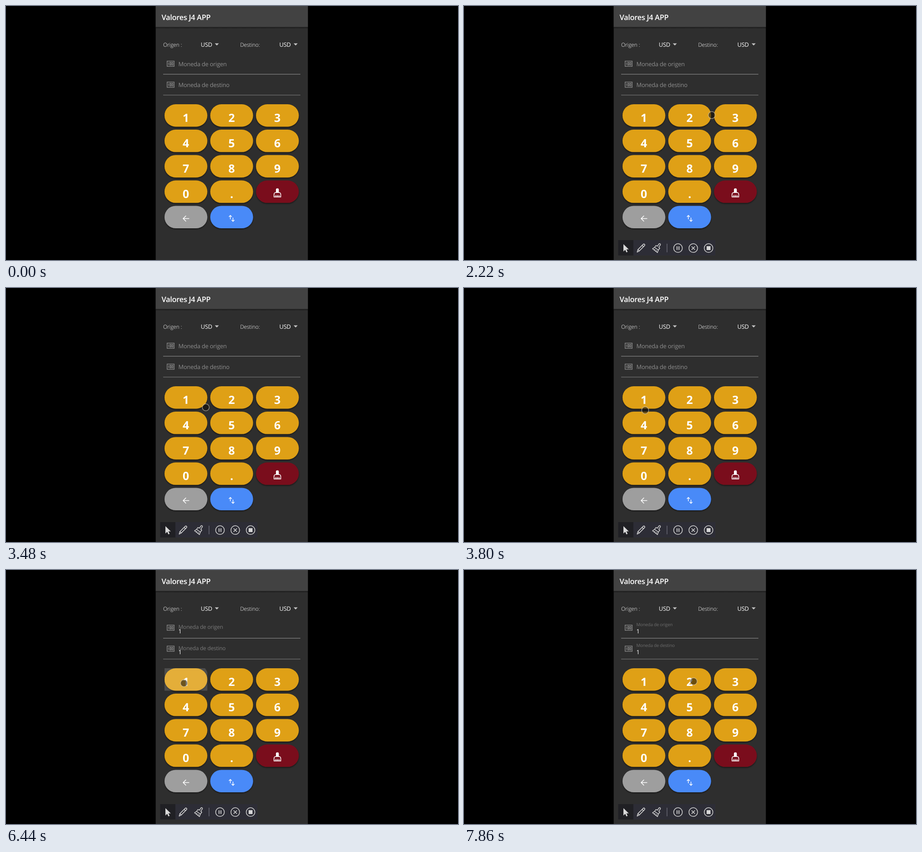
Animation, 998 px wide and 561 px high, one loop 8000 ms. Source, as an HTML page:

```html
<!DOCTYPE html>
<html lang="es">
<head>
<meta charset="utf-8">
<title>Conversor</title>
<style>
html, body { margin: 0; width: 100%; height: 100%; overflow: hidden; background: #000; }
svg { display: block; width: 100vw; height: 100vh; }
text { font-family: "Open Sans", "Noto Sans", sans-serif; font-size: 13px; letter-spacing: -.02em; fill: #fff; text-rendering: geometricPrecision; }
.title { font-size: 16.5px; font-weight: 600; }
.caption { font-size: 12px; font-weight: 300; letter-spacing: -.01em; }
.digit { font-size: 25px; font-weight: 700; text-anchor: middle; letter-spacing: 0; }
.line { fill: none; stroke: #fff; stroke-width: 1.6; }
.tool { fill: none; stroke: #d4d4d4; stroke-width: 1.5; stroke-linejoin: round; }
.solid { fill: #d8d8d8; }
</style>
</head>
<body>
<svg viewBox="0 0 998 561" preserveAspectRatio="none">
  <defs>
    <filter id="shadow" x="-10%" y="-10%" width="120%" height="130%">
      <feDropShadow dx="0" dy="2" stdDeviation="1.6" flood-opacity=".5"/>
    </filter>
    <linearGradient id="fade" x2="0" y2="1">
      <stop offset="0" stop-color="#000" stop-opacity=".45"/>
      <stop offset="1" stop-color="#000" stop-opacity="0"/>
    </linearGradient>
    <clipPath id="keyBox"><rect x="350" y="217" width="94.5" height="49.5"/></clipPath>
    <g id="note">
      <rect x=".7" y=".7" width="15.6" height="11.6" fill="none" stroke="#878787" stroke-width="1.4"/>
      <path d="M4 3.5v6M6.8 3.7h2.4v5.6H6.8zM11.3 3.7h2.4v5.6h-2.4z" fill="none" stroke="#878787" stroke-width="1.3"/>
    </g>
  </defs>

  <rect width="998" height="561" fill="#000"/>
  <rect x="330.5" width="336" height="561" fill="#2e2e2e"/>
  <rect x="330.5" width="336" height="46.5" fill="#424242"/>
  <rect x="330.5" y="46.5" width="336" height="4" fill="url(#fade)"/>
  <text class="title" x="343.5" y="30.5">Valores J4 APP</text>

  <text class="caption" x="347" y="89.5">Origen :</text>
  <text x="430" y="90">USD</text>
  <text class="caption" x="517" y="89.5">Destino:</text>
  <text x="603.5" y="90">USD</text>
  <path d="M461 82.5h9l-4.5 4.7zM635 82.5h9l-4.5 4.7z" fill="#c4c4c4"/>

  <use href="#note" x="355" y="121"/>
  <use href="#note" x="355" y="167.3"/>
  <path d="M347 150.6h303M347 196.8h303" stroke="#828282" stroke-width="1.1"/>
  <g id="hints"></g>
  <g id="values">
    <text x="380.5" y="140">1</text>
    <text x="380.5" y="186.3">1</text>
  </g>

  <g id="keys"></g>
  <g class="line">
    <path d="M404.5 469.5H391.5M397.5 463.3l-6.3 6.2 6.3 6.2"/>
    <path d="M495.4 471v-8M492.2 465.8l3.2-3.2 3.2 3.2M501.2 467.5v8M498 472.6l3.2 3.2 3.2-3.2" stroke-width="1.4"/>
    <path d="M597 412v-6.2a2.2 2.2 0 0 1 4.4 0v6.2h1.2a4 4 0 0 1 4 4v5.6h-14.8v-5.6a4 4 0 0 1 4-4zM595.7 421v-3.4M599.2 421v-3.4M602.7 421v-3.4"/>
    <path d="M597 405.8a2.2 2.2 0 0 1 4.4 0v6.2H597z" fill="#fff"/>
  </g>
  <g clip-path="url(#keyBox)"><circle id="ripple" cx="393" cy="250" fill="#fff"/></g>

  <g id="toolbar">
    <rect x="340.5" y="517" width="214.5" height="34" fill="#2d2d36"/>
    <rect x="340.5" y="517" width="33.5" height="34" fill="#202024"/>
    <path class="solid" d="M352 526v16.2l3.9-3.6 2.7 5.7 2.7-1.2-2.7-5.6h5.2z"/>
    <g class="tool">
      <path d="M382.3 543.7l1.6-5.6 11.7-11.7a2.1 2.1 0 0 1 3 3l-11.9 12zM383.9 538.1l3.1 3M393.2 528.8l3.1 3"/>
      <path d="M427 530.5l3.6-5.2a1.9 1.9 0 0 1 3 2.2l-3.6 5.4 2.4 1.9-3.4 4.4-8.2-6.2 3.1-4.1zM420.8 533l-4.5 3.2 10.8 8.5 1.9-5.5M420 539.2l2-2.1M423.5 542l2-2.3"/>
      <path d="M448.3 525v19" stroke="#777783" stroke-width="1.2"/>
      <circle cx="472.5" cy="534.7" r="9.6"/>
      <circle cx="506.2" cy="534.7" r="9.6"/>
      <circle cx="540" cy="534.7" r="9.6"/>
      <path d="M470.4 530.7v8M474.6 530.7v8" stroke-width="1.9"/>
      <path d="M502.5 531l7.4 7.4M509.9 531l-7.4 7.4"/>
    </g>
    <rect class="solid" x="535.7" y="530.4" width="8.6" height="8.6"/>
  </g>

  <circle id="pointer" r="7.7" fill="#100c08" fill-opacity=".56" stroke="#ddd2bb" stroke-opacity=".6" stroke-width="1.5"/>
</svg>
<script>
const LOOP = 8000;
const NS = "http://www.w3.org/2000/svg";
const $ = id => document.getElementById(id);

function add(parent, tag, attrs, content = "") {
  const el = document.createElementNS(NS, tag);
  for (const k in attrs) el.setAttribute(k, attrs[k]);
  el.textContent = content;
  parent.append(el);
  return el;
}

const labels = ["1", "2", "3", "4", "5", "6", "7", "8", "9", "0", ".", "clear", "back", "swap"];
const fills = { clear: "#7a101c", back: "#9e9e9e", swap: "#4a8af8" };
labels.forEach((label, i) => {
  const x = 350 + i % 3 * 101, y = 217 + Math.floor(i / 3) * 56.1;
  add($("keys"), "rect", { x, y, width: 94.5, height: 49.5, rx: 24.7,
    fill: fills[label] || "#dfa014", filter: "url(#shadow)" });
  if (!fills[label]) add($("keys"), "text", { class: "digit", x: x + 47.2, y: y + 38.6 }, label);
});

const hints = [["Moneda de origen", 133], ["Moneda de destino", 179.3]]
  .map(([name, y]) => ({ y, el: add($("hints"), "text", {}, name) }));

// Pointer waypoints: time, x, y
const path = [
  [1700, 614, 222], [1820, 614, 222], [2500, 508, 252], [2780, 503, 254], [3060, 503, 254],
  [3800, 400, 270], [3900, 400, 270], [4640, 393, 250], [4740, 392, 250], [5620, 392, 250],
  [5640, 393, 250], [7540, 393, 250], [7580, 432, 249], [7720, 432, 249], [7721, 476, 247],
  [7859, 476, 247], [7860, 507, 246], [LOOP, 507, 246]
];

const part = (t, a, b) => Math.min(1, Math.max(0, (t - a) / (b - a)));
const smooth = p => p * p * (3 - 2 * p);
const mix = (a, b, p) => a + (b - a) * p;
const show = (el, on) => el.setAttribute("visibility", on ? "visible" : "hidden");

function pointerAt(t) {
  const i = Math.max(1, path.findIndex(k => k[0] > t));
  const [a, b] = [path[i - 1], path[i]];
  const p = smooth(part(t, a[0], b[0]));
  return [mix(a[1], b[1], p), mix(a[2], b[2], p)];
}

function draw(t) {
  show($("toolbar"), t >= 420);
  show($("pointer"), t >= 1700);
  const [x, y] = pointerAt(t);
  $("pointer").setAttribute("cx", x);
  $("pointer").setAttribute("cy", y);

  show($("values"), t >= 6360);
  const p = smooth(part(t, 6360, 6580));
  const grey = Math.round(mix(142, 108, Math.min(1, p * 2)));
  for (const { el, y } of hints) {
    el.setAttribute("transform", `translate(380.5 ${y - 9.3 * p}) scale(${1 - p / 4})`);
    el.style.fill = `rgb(${grey},${grey},${grey})`;
  }

  $("ripple").setAttribute("r", 70 * part(t, 6300, 6472));
  $("ripple").setAttribute("opacity", .15 * (1 - part(t, 6560, 6980)));
}

let start;
function tick(now) {
  start ??= now;
  draw((now - start) % LOOP);
  requestAnimationFrame(tick);
}
draw(0);
requestAnimationFrame(tick);
</script>
</body>
</html>
```
